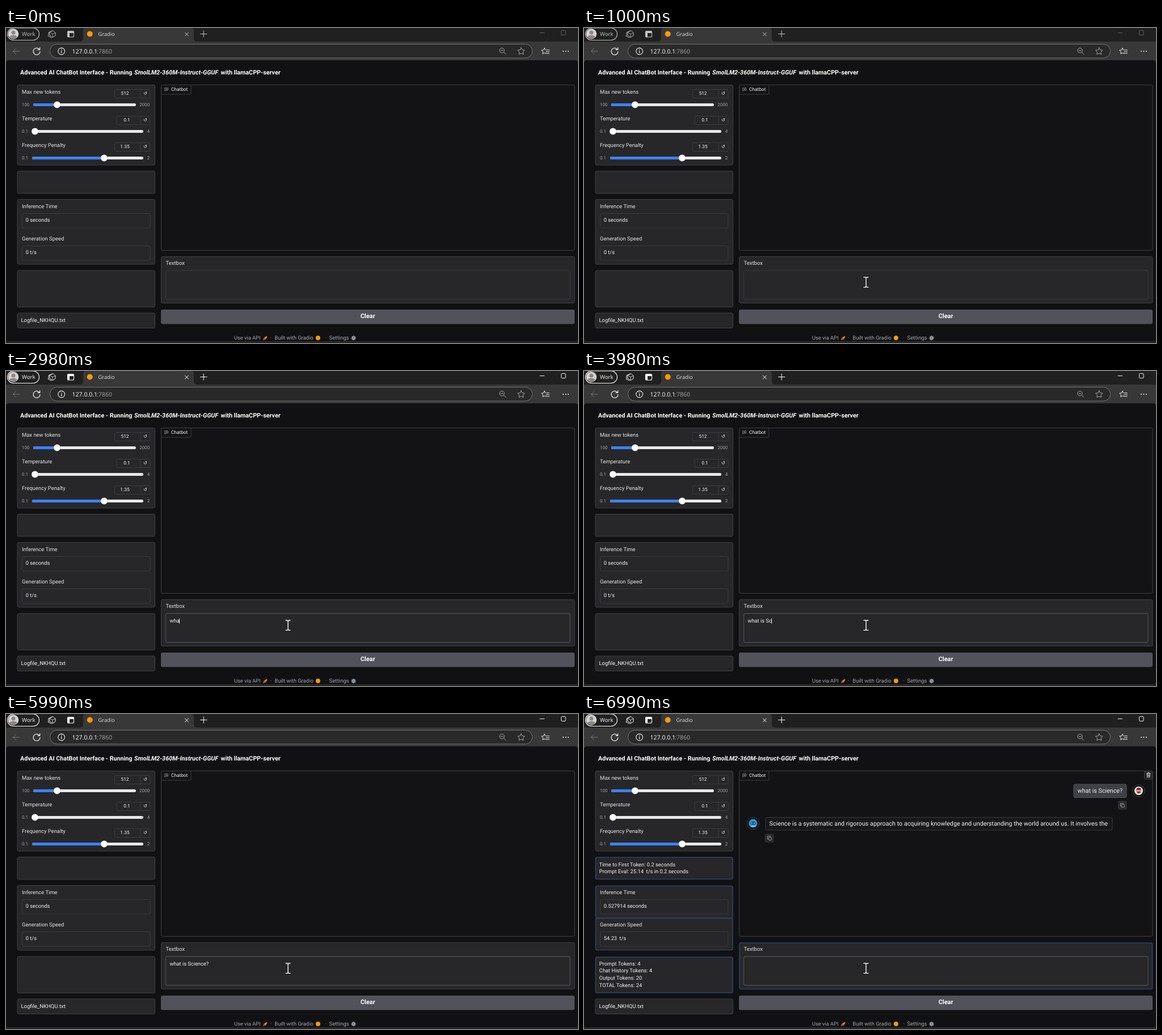
An HTML page for the animation above (8000 ms loop, 1008 by 556 pixels).

```html
<!DOCTYPE html>
<html lang="en">
<head>
<meta charset="utf-8">
<title>Chatbot interface</title>
<style>
html, body { margin: 0; width: 100%; height: 100%; overflow: hidden; background: #111113; }
svg { display: block; width: 1008px; height: 556px; }
text { font-family: Roboto, "Liberation Sans", sans-serif; font-size: 9.45px; fill: #f4f4f5; white-space: pre; text-rendering: geometricPrecision; }
.chrome { font-family: "Open Sans", "Noto Sans", sans-serif; }
.symbol { font-family: "DejaVu Sans", sans-serif; }
.line { fill: none; stroke-linecap: round; stroke-linejoin: round; }
</style>
</head>
<body>
<svg id="stage" viewBox="0 0 1008 556" xmlns="http://www.w3.org/2000/svg"></svg>
<script>
const NS = 'http://www.w3.org/2000/svg';
const LOOP = 8000;
const C = {
  page: '#111113', block: '#27272a', edge: '#3f3f46', inner: '#3b3b41', focus: '#4a4a51',
  busy: '#2d4266', text: '#f4f4f5', label: '#e4e4e7', dim: '#a1a1aa',
  blue: '#3b82f6', brand: '#f99b07'
};

const stage = document.getElementById('stage');
let layer = stage;

function add(tag, attrs, content) {
  const el = document.createElementNS(NS, tag);
  for (const key in attrs) el.setAttribute(key, attrs[key]);
  if (content !== undefined) el.textContent = content;
  layer.appendChild(el);
  return el;
}

function group(draw) {
  const parent = layer;
  const g = add('g', {});
  layer = g;
  draw();
  layer = parent;
  return g;
}

// Corner coordinates; the border is centred on them.
function box(x1, y1, x2, y2, r, fill, stroke = 'none', width = 1) {
  return add('rect', { x: x1, y: y1, width: x2 - x1, height: y2 - y1, rx: r, fill, stroke, 'stroke-width': width });
}

const panel = (x1, y1, x2, y2) => box(x1, y1, x2, y2, 2.5, C.block, C.edge);
const busy = (x1, y1, x2, y2) => box(x1, y1, x2, y2, 2.5, C.block, C.busy, 1.6);
const dot = (cx, cy, r, fill, stroke = 'none', width = 1) =>
  add('circle', { cx, cy, r, fill, stroke, 'stroke-width': width });
const line = (d, stroke, width = 1) =>
  add('path', { d, class: 'line', stroke, 'stroke-width': width });
const shape = (d, fill) => add('path', { d, fill });

function say(x, y, str, size = 9.45, fill = C.text, more = {}) {
  const { css = '', ...attrs } = more;
  return add('text', { x, y, ...attrs, style: `font-size:${size}px;fill:${fill};${css}` }, str);
}

function star(cx, cy, r, stroke) {
  let d = '';
  for (let i = 0; i < 10; i++) {
    const a = -Math.PI / 2 + i * Math.PI / 5;
    const k = i % 2 ? r * 0.5 : r;
    d += `${i ? 'L' : 'M'}${(cx + k * Math.cos(a)).toFixed(2)} ${(cy + k * Math.sin(a)).toFixed(2)}`;
  }
  line(d + 'Z', stroke);
}

function windowIcons(color, faint) {
  box(2.5, 0, 58.5, 21.5, 10.8, 'none', color, 1.1);
  say(28, 13.7, 'Work', 9.6, color, { class: 'chrome' });
  // workspaces
  line('M77 7.5L83 4.5L87 8.5V13.5L82 16.5L77.5 13.5ZM75 14V8L81 5M80 17L74 14', color, .9);
  line('M77.5 8L82 10.5L87 8.5M82 10.5V16.5', color, .7);
  // tab actions
  box(108.5, 5.5, 119.5, 16, 2, 'none', color, 1.1);
  shape('M108.5 5.5H119.5V9H112V16H108.5Z', color);
  line('M315.5 8L321.5 14M321.5 8L315.5 14', color);
  line('M342.5 10.5H354M348.2 5V16', color);
  line('M941 8.5H948.5', faint);
  box(978.5, 4.5, 986, 12.5, 1, 'none', faint);
}

function browser() {
  box(0, 0, 1008, 556, 0, '#202020');
  box(0, 24, 1008, 62, 0, '#383838');
  shape('M130 24Q136 24 136 18V5Q136 0 141 0H326Q331 0 331 5V18Q331 24 337 24Z', '#383838');
  dot(13, 10.5, 9.3, '#d6d3d0');
  dot(13, 8, 3.5, '#8b8784');
  shape('M6.3 16.5Q7 12.5 13 12.5T19.7 16.5Q13 22 6.3 16.5Z', '#8b8784');
  dot(147.7, 10.5, 5, C.brand);
  say(162.5, 13.7, 'Gradio', 9.3, '#dedede', { class: 'chrome' });

  line('M24 41H12.5M17.5 36L12.5 41L17.5 46', '#777');
  line('M59 38A6 6 0 1 0 60 41.5M59.7 34.5V38.3H56', '#f0f0f0', 1.2);
  box(77.5, 28.5, 927.5, 53, 12.2, '#292929', '#757575');
  dot(97.7, 41, 5.9, 'none', '#eee', 1.1);
  line('M97.7 40.3V44', '#eee', 1.2);
  dot(97.7, 38, .8, '#eee');
  say(116.6, 44.5, '127.0.0.1', 10.5, '#fff', { class: 'chrome' });
  say(160.2, 44.5, ':7860', 10.5, '#a3a3a3', { class: 'chrome' });
  dot(874, 39.6, 4.2, 'none', '#a8a8a8');
  line('M877.2 42.8L881 46.5M872 39.6H876', '#a8a8a8');
  star(907.8, 41.3, 6.6, '#a8a8a8');
  star(949, 41, 5.6, '#eee');
  shape('M951.5 38H958V46H951.5Z', '#383838');
  line('M952.5 38.7H957.3M952.5 41.7H957.3M952 44.7H957.3', '#eee', 1.1);
  for (const x of [982, 986.4, 990.8]) dot(x, 41, 1, '#eee');

  box(0, 57, 1008, 553, 5, C.page);
  line('M3 553.5H1005', '#3a3a3a', .8);
}

// One slider row; thumb and track are given by their ends.
function slider(y, name, value, left, low, high, from, to, at) {
  say(28, y + 16.1, name, 9.45, C.label);
  box(left, y + 8.5, 254, y + 23.5, 2, C.block, C.inner);
  line(`M237 ${y + 8.5}V${y + 23.5}`, C.inner);
  say(left + 18, y + 18, value, 8.4, C.text, { 'text-anchor': 'middle' });
  say(245.4, y + 18.4, '↺', 8.2, C.text, { class: 'symbol', 'text-anchor': 'middle' });
  say(28, y + 37.6, low, 8, C.dim);
  say(253.3, y + 37.6, high, 8, C.dim, { 'text-anchor': 'end' });
  box(from, y + 33, to, y + 38, 2.5, '#e8e8ea');
  box(from, y + 33, at, y + 38, 2.5, C.blue);
  dot(at, y + 35.4, 6, '#c9c9cc');
  dot(at, y + 35.2, 5.5, '#fff');
}

function gear(cx, cy) {
  for (let i = 0; i < 8; i++) {
    const a = i * Math.PI / 4;
    line(`M${cx} ${cy}L${cx + 3.7 * Math.cos(a)} ${cy + 3.7 * Math.sin(a)}`, '#9ba3ab', 1.4);
  }
  dot(cx, cy, 2.9, '#9ba3ab');
  dot(cx, cy, 1.1, '#55595f');
}

function page() {
  const bold = { css: 'font-weight:600' };
  say(25, 81.7, 'Advanced AI ChatBot Interface - Running', 10.7, '#fff', bold);
  say(226, 81.7, 'SmolLM2-360M-Instruct-GGUF', 10.8, '#fff', { css: 'font-weight:600;font-style:italic' });
  say(378.5, 81.7, 'with llamaCPP-server', 10.75, '#fff', bold);

  panel(20, 100.5, 262.5, 242);
  slider(100, 'Max new tokens', '512', 191.5, '100', '2000', 48, 229, 90);
  slider(147, 'Temperature', '0.1', 195, '0.1', '4', 46, 242, 51);
  slider(194, 'Frequency Penalty', '1.35', 191.5, '0.1', '2', 46, 242, 173);
  panel(20, 503, 262.5, 529.5);
  say(26.5, 519.2, 'Logfile_NKHQU.txt', 9.5);

  box(273.5, 100.5, 1002, 392.5, 2.5, '#131315', C.edge);
  box(273.5, 100.5, 326, 117, 2, '#131315', C.edge);
  line('M280 105.7H285.5V110H282L280 111ZM281.5 107.3H284M281.5 108.7H284', C.dim, .7);
  say(291, 110.7, 'Chatbot', 8.3);

  box(273, 497, 1002, 522.5, 3, '#52525b');
  say(637.6, 512.2, 'Clear', 10.9, '#fff', { 'text-anchor': 'middle', css: 'font-weight:600' });

  const foot = '#a3a7b2';
  say(402, 550.2, 'Use via API', 9.25, foot);
  shape('M460.5 543.5Q457 544 454.7 547L457.3 549.6Q460.2 547.4 460.5 543.5Z', '#d9823a');
  shape('M455.4 546.2L453.2 547.3L454.6 548.4ZM456.2 549.3L457.6 551L458.2 548.7Z', '#d2433a');
  shape('M454.6 547.8L452.8 551.3L456.4 549.6Z', '#f48c22');
  say(465.5, 550.2, '·', 9.4, foot);
  say(473.3, 550.2, 'Built with Gradio', 9.4, foot);
  dot(549.8, 547, 4, C.brand);
  say(562.5, 550.2, '·', 9.4, foot);
  say(569.5, 550.2, 'Settings', 9.6, foot);
  gear(612.5, 547.2);
}

function stats(time, speed) {
  say(28, 318.3, 'Inference Time', 9.45, C.label);
  box(28.5, 327.5, 254, 353, 2.5, C.block, C.inner);
  say(34.8, 342.1, time, 9.25);
  say(28, 375.3, 'Generation Speed', 9.45, C.label);
  box(28.5, 384.5, 254, 410, 2.5, C.block, C.inner);
  say(34.8, 399.1, speed, 9.25);
}

function idlePanels() {
  panel(20, 252.5, 262.5, 292);
  panel(20, 302.5, 262.5, 417);
  panel(20, 428, 262.5, 492.5);
  panel(273.5, 403.5, 1002, 485.5);
  stats('0 seconds', '0 t/s');
}

function copyButton(x, y) {
  box(x, y, x + 14.5, y + 14, 2, C.block, C.inner);
  line(`M${x + 4.5} ${y + 9}H${x + 3.8}V${y + 3.7}H${x + 9}V${y + 4.5}`, C.dim, .9);
  box(x + 5.7, y + 5.7, x + 10.8, y + 10.6, .6, 'none', C.dim, .9);
}

function answer() {
  busy(20.5, 253, 262, 291.5);
  busy(20.5, 303.5, 262, 360);
  busy(20.5, 360.5, 262, 416.5);
  busy(20.5, 429, 262, 492);
  busy(274, 404, 1001.5, 485.5);
  say(26.8, 268.7, 'Time to First Token: 0.2 seconds', 9.3);
  say(26.8, 281.2, 'Prompt Eval: 25.14  t/s in 0.2 seconds', 9.35);
  stats('0.527914 seconds', '54.23  t/s');
  ['Prompt Tokens: 4', 'Chat History Tokens: 4', 'Output Tokens: 20', 'TOTAL Tokens: 24']
    .forEach((row, i) => say(26.8, 443.7 + i * 12.7, row, 9.35));

  box(987.5, 100.5, 1002, 115, 2, C.block, C.inner);
  line('M991.5 105H998M993.5 104.8V103.6H996V104.8M992.2 105.3L992.6 111.3H996.9L997.3 105.3M994 107V109.6M995.6 107V109.6', C.text, .8);

  box(863, 124, 956, 147.5, 2.5, '#3f3f46', '#52525b');
  say(869.8, 138.7, 'what is Science?', 10.72);
  dot(977.5, 135.5, 10.8, C.page, C.edge);
  dot(977.5, 135.5, 7.5, '#f3eeee');
  dot(977.5, 135.2, 5.2, '#f2994a');
  shape('M973.5 134Q973.5 130 977.5 130T981.5 134Z', '#56306b');
  shape('M974.5 137H980.5Q980 140 977.5 140T974.5 137Z', '#56306b');
  copyButton(941.5, 154);

  dot(298, 193, 10.8, C.page, C.edge);
  dot(298, 193, 7.5, '#2f9be0');
  box(293.5, 190, 302.5, 195.2, 2.6, '#123a66');
  dot(295.9, 192.6, 1.2, '#7fe0f7');
  dot(300.1, 192.6, 1.2, '#7fe0f7');
  line('M294.5 198H301.5', '#d7eefa', 1.1);
  box(320, 182.5, 931, 205, 2.5, '#18181b', C.inner);
  say(326.6, 196.7, 'Science is a systematic and rigorous approach to acquiring knowledge and understanding the world around us. It involves the', 10.76);
  copyButton(319.5, 212);
}

browser();
const away = group(() => windowIcons('#c4c4c4', '#626262'));
const active = group(() => windowIcons('#ffffff', '#f0f0f0'));
page();
const idle = group(idlePanels);
const reply = group(answer);
say(281.5, 418.3, 'Textbox', 9.5, C.label);
const field = box(281.5, 428, 994, 479, 2.5, C.block, C.inner);
const typed = say(288.4, 443.7, '', 9.3);
const caret = line('M0 437V445.5', C.text, .9);
const pointer = group(() => {
  const beam = 'M493 440H496L497 441L498 440H501M497 441V456.5M493 457.5H496L497 456.5L498 457.5H501';
  line(beam, '#101010', 3);
  line(beam, '#fff', 1.5);
});

// start, typed text, caret x (0 = hidden)
const typing = [
  [0, '', 0],
  [2980, 'wha', 305.5],
  [3980, 'what is Sc', 330.6],
  [4980, 'what is Science?', 357.5],
  [5990, 'what is Science?', 0],
  [6990, '', 0]
];

const show = (el, on) => el.setAttribute('visibility', on ? 'visible' : 'hidden');

function render(t) {
  const focused = t >= 1980;
  const done = t >= 6990;
  show(pointer, t >= 1000);
  show(away, !focused);
  show(active, focused);
  show(idle, !done);
  show(reply, done);
  field.setAttribute('stroke', focused ? C.focus : C.inner);
  field.setAttribute('stroke-width', focused ? 1.3 : 1);
  const [, str, x] = typing.filter(step => t >= step[0]).pop();
  typed.textContent = str;
  caret.setAttribute('transform', `translate(${x} 0)`);
  show(caret, x > 0);
}

function tick() {
  render(performance.now() % LOOP);
  requestAnimationFrame(tick);
}
tick();
</script>
</body>
</html>
```
